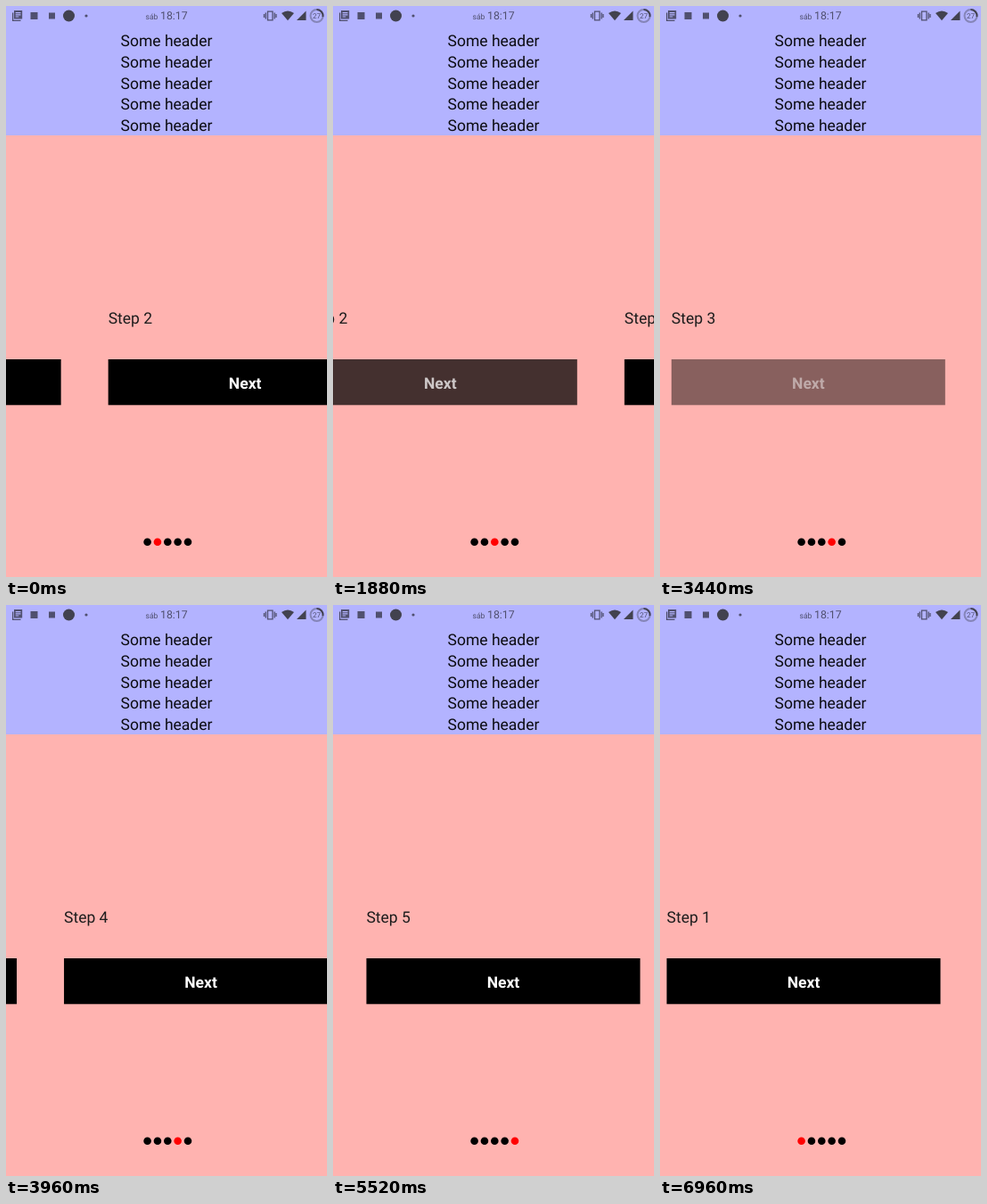
An HTML page for the animation above (7000 ms loop, 360 by 640 pixels).

```html
<!DOCTYPE html>
<html lang="en">
<head>
<meta charset="utf-8">
<title>Step wizard</title>
<style>
  html, body { margin: 0; width: 100%; height: 100%; overflow: hidden; background: #ffb3b0; }
  svg { display: block; width: 360px; height: 640px; font: 17.5px Roboto, sans-serif; text-rendering: geometricPrecision; }
  .step { fill: #1c1c1c; }
  .next { font-weight: 700; fill: #fff; text-anchor: middle; }
  .head { text-anchor: middle; fill: #0c0c12; }
  .status { fill: #50506f; }
</style>
</head>
<body>
<svg viewBox="0 0 360 640">
  <rect width="360" height="640" fill="#ffb3b0"/>
  <rect width="360" height="145" fill="#b3b3ff"/>
  <g id="headers" class="head"></g>
  <g id="track"></g>
  <g id="dots"></g>

  <g class="status">
    <path d="M7 7.5h1.3v8.2h8.2V17H7z"/>
    <path fill-rule="evenodd" d="M9 5h9.2v9.4H9zM10.700 7v1.2h5.800V7zM10.700 9.200v1.200h5.800V9.200zM10.700 11.400v1.200h3.600v-1.200z"/>
    <rect x="27.5" y="7" width="8" height="8"/>
    <rect x="48" y="7.5" width="7" height="7"/>
    <circle cx="70.5" cy="11" r="6.5" fill="#42424f"/>
    <circle cx="90" cy="11" r="1.6"/>
    <text x="156.5" y="15" font-size="8.6">sáb</text>
    <text x="173" y="15.3" font-size="12.3">18:17</text>

    <path fill="none" stroke="#50506f" stroke-width="1.3" d="M293.5 6.2h5.5v9.6h-5.5zM291.3 7.5v7M301.2 7.5v7M289.5 9v4M303 9v4"/>
    <path fill="#42424f" d="M309 8Q316 3 323 8L316 16.3z"/>
    <path fill="#42424f" d="M326 16L336.500 5.500V16z"/>
    <circle cx="348.5" cy="11" r="7" fill="none" stroke="#8585b8" stroke-width="2"/>
    <path d="M348.5 4A7 7 0 0 1 355.4 12.2" fill="none" stroke="#42424f" stroke-width="2"/>
    <text x="348.5" y="13.9" font-size="8" text-anchor="middle">27</text>
  </g>
</svg>
<script>
const LOOP = 7000, PAGE = 360, LEFT = 26.5;
const byId = id => document.getElementById(id);
const list = (n, make) => Array.from({ length: n }, (_, i) => make(i)).join('');

byId('headers').innerHTML = list(5, i =>
  `<text x="180" y="${45.2 + i * 23.65}">Some header</text>`);
byId('track').innerHTML = list(5, i =>
  `<g transform="translate(${LEFT + i * PAGE})">
    <text class="step" y="356">Step ${i + 1}</text>
    <g class="button"><rect y="396" width="307" height="51.3"/>
    <text class="next" x="153.5" y="428.7">Next</text></g>
  </g>`);
byId('dots').innerHTML = list(5, i =>
  `<circle cx="${158.6 + i * 11.35}" cy="600.8" r="4.3"/>`);

const buttons = document.querySelectorAll('.button');
const dots = document.querySelectorAll('#dots circle');

// Each move: page left, page reached, press, release, scroll start, scroll duration
const moves = [
  [0, 1, -620, -467, -379, 1015],
  [1, 2, 1510, 1733, 1821.5, 1015],
  [2, 3, 3185, 3339, 3428, 1015],
  [3, 4, 4575, 4734, 4823, 1015],
  [4, 0, 5940, 6078, 6168.2, 1038]
];

const clamp = p => Math.min(1, Math.max(0, p));
const outCubic = p => 1 - (1 - p) ** 3;
const inOutQuad = p => p < 0.5 ? 2 * p * p : 1 - 2 * (1 - p) ** 2;

function opacity(t, press, release) {
  const held = 1 - 0.8 * inOutQuad(clamp((Math.min(t, release) - press) / 150));
  return held + (1 - held) * inOutQuad(clamp((t - release) / 250));
}

function draw(t) {
  let page = 0, active = 0;
  for (const [from, to, press, release, start, duration] of moves) {
    if (t >= start) page = from + (to - from) * outCubic(clamp((t - start) / duration));
    if (t >= start - 40) active = to;
    // Box and label fade separately, so the box shows through its label
    buttons[from].setAttribute('fill-opacity', opacity(t, press, release));
  }
  byId('track').setAttribute('transform', `translate(${-page * PAGE})`);
  dots.forEach((dot, i) => dot.setAttribute('fill', i === active ? '#f00' : '#000'));
}

const begin = performance.now();
function tick() {
  draw((performance.now() - begin) % LOOP);
  requestAnimationFrame(tick);
}
tick();
</script>
</body>
</html>
```
